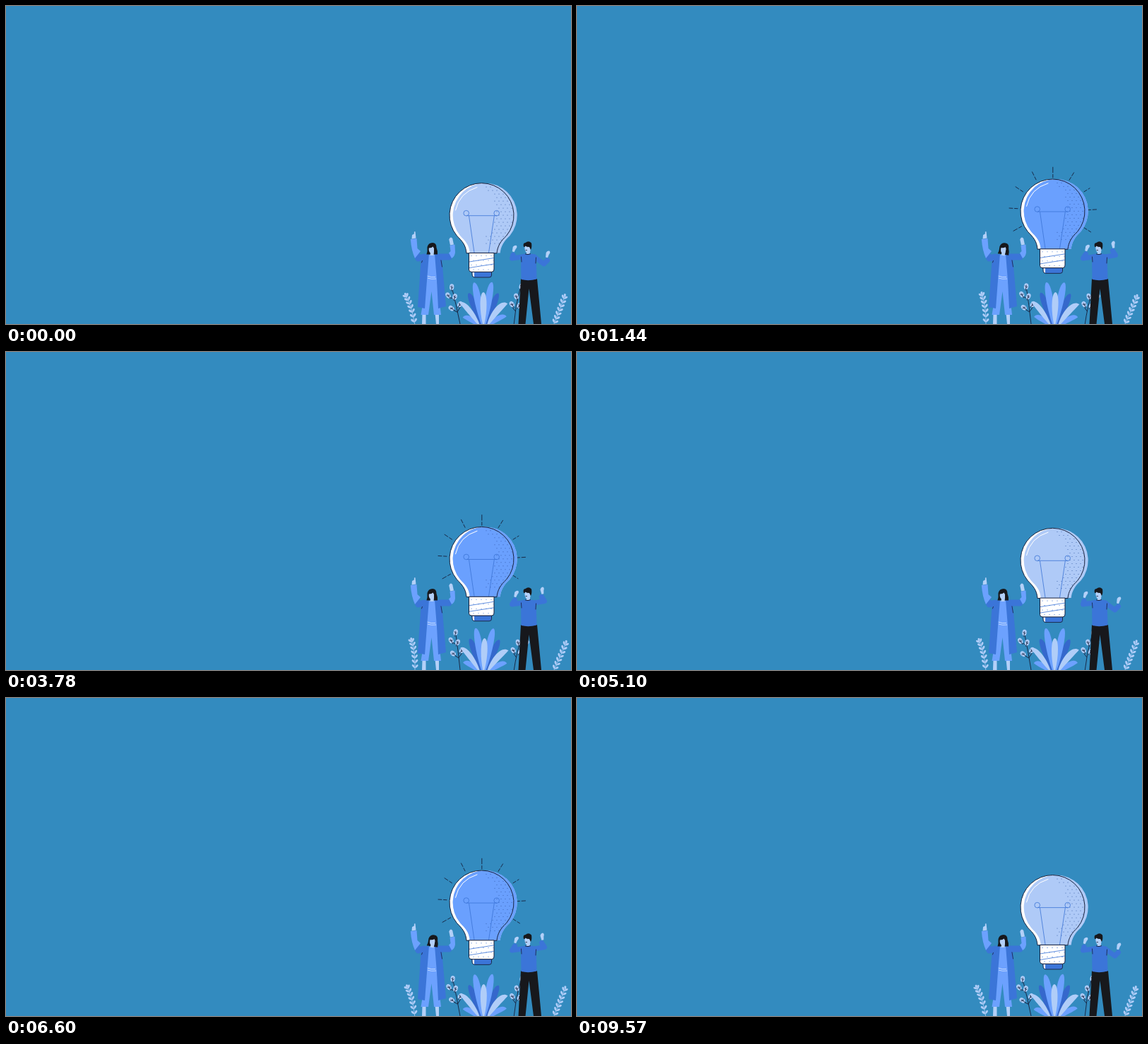
An HTML page for the animation above (9600 ms loop, 800 by 450 pixels).

```html
<!DOCTYPE html>
<html lang="en">
<head>
<meta charset="utf-8">
<style>
  html, body { margin: 0; height: 100%; overflow: hidden; background: #338bbf; }
  svg { display: block; width: 100%; height: 100%; }
  .ink { stroke: #17203c; fill: none; stroke-linecap: round; }
  .fine { stroke: #3c74d6; fill: none; stroke-width: .8; }
  .arm { fill: none; stroke-linejoin: round; stroke-linecap: round; }
  .skin { fill: #b3d0f8; }
  .sky { fill: #6ca1fe; }
  .coat { fill: #3b75d8; }
  .black { fill: #17181c; }
</style>
</head>
<body>
<svg viewBox="0 0 800 450">
  <defs>
    <path id="glass" d="M652 349.5C651 338 646 333 638.3 325A45.5 45.5 0 1 1 708.7 325C700 333 696 340 695 349.5Z"/>
    <path id="fist" d="M-1.5 6L-2.5 -.5Q-1 -4 1.8 -3.8Q4 -2 2.2 1L1.5 6Z"/>
  </defs>

  <g id="plants"></g>

  <g id="bulb">
    <g id="rays" class="ink" stroke-width=".9"></g>
    <use href="#glass" fill="#fff"/>
    <use href="#glass" x="4.7" fill="#afcaf7"/>
    <use id="glow" href="#glass" x="4.7" fill="#6aa0fe"/>
    <g id="dots" fill="#2c529f"></g>
    <path d="M636.5 289Q642 264 667 256.5" fill="none" stroke="#fff" stroke-width="1" stroke-linecap="round"/>
    <g class="fine">
      <circle cx="651.7" cy="293.2" r="3.8"/>
      <circle cx="694.7" cy="293.2" r="3.8"/>
      <path d="M652 296.7H695M655.5 297L663 349M691.3 297L683.5 349"/>
    </g>
    <use href="#glass" class="ink" stroke-width="1"/>
    <path d="M660 376H687.5V381Q687.5 384 684 384H664Q660 384 660 380Z" class="coat"/>
    <path d="M660.5 377H663V383.5Q660.5 383 660.5 380Z" fill="#fff"/>
    <path d="M660 376H687.5V381Q687.5 384 684 384H664Q660 384 660 380Z" class="ink" stroke-width=".9"/>
    <path d="M655.5 349.5H691V373Q691 376.3 687.5 376.3H659Q655.5 376.3 655.5 373Z" fill="#fff" stroke="#17203c"/>
    <path class="fine" d="M656 362L691 356.5M656 370.5L691 365"/>
    <g id="specks" fill="#3c74d6"></g>
  </g>

  <g id="woman">
    <path class="skin" d="M589.5 435H594.5V450H589ZM607.5 435H613V450H609Z"/>
    <path class="sky" d="M596 386H610L616 437H606L602.5 404L598 437H587.5Z"/>
    <path class="sky" d="M596 352H610L611 389H594Z"/>
    <path d="M596.5 382Q602 384.5 608 383.5M597 385Q602 387 609 386" fill="none" stroke="#d9e8ff" stroke-width=".8"/>
    <path class="coat" d="M599 351L590 352Q587 354 587.5 361L583 426L593 428L596 388ZM607 351L615 351Q618 355 617.5 362L623 425L612 428L610 388Z"/>
    <path class="ink" stroke-width=".8" d="M591.5 355L588.5 363M615.5 357L617.5 369"/>
    <g id="armL">
      <path class="arm" stroke="#3b75d8" stroke-width="9" d="M592 355L584 357L582 353"/>
      <path class="sky" d="M572.8 330L581.5 329L582.5 343L587 347L579 357Q574 346 572.8 330Z"/>
      <path class="skin" d="M574.5 329.5L575 324L577.8 322.5L578 319.2H579.5L580.5 328.5Z"/>
    </g>
    <g id="armR">
      <path class="arm" stroke="#3b75d8" stroke-width="9" d="M614 355L627 355"/>
      <path class="sky" d="M628.5 339L635.5 337.5L636 349Q635 355 631 357L627 349.5L629.5 347Z"/>
      <path class="skin" d="M629 338.5L627.3 330.5Q629 325.5 632.2 329L634 337.5Z"/>
    </g>
    <g id="headW">
      <path class="black" d="M595.5 351.5Q597 347 596.5 341Q598 335 604 335Q609.5 335 609.5 342Q611.5 347 611 351.5Z"/>
      <path class="skin" d="M598.8 342.5Q603 342.5 604.5 340.5L606 343V348L605.5 353H600.5L600.8 349.5Q598.3 347.5 598.8 342.5Z"/>
    </g>
  </g>

  <g id="man">
    <path class="black" d="M729 386H752L758 450H747L740.5 400L735.5 450H725.5Z"/>
    <path id="sleeves" class="arm" stroke="#3b75d8" stroke-width="7"/>
    <path class="coat" d="M729 352Q738 348.5 750.5 352L751.5 386.5Q740 389.5 729.5 387Z"/>
    <path class="ink" stroke-width=".8" d="M729.5 355L730 362M750.5 356L750 364"/>
    <g class="skin" id="fists"><use href="#fist"/><use href="#fist"/></g>
    <path class="skin" d="M734.5 339H742.5V346Q742 348 741.5 351H736.8V348.5Q734 347 734.5 339Z"/>
    <path class="black" d="M733 341Q731.5 335 735.5 335Q740 331.5 744 335.5Q745 341 743 345L741 341Q737 341 735.5 339.5Q735 341 733 341Z"/>
    <path class="ink" stroke-width="1" d="M735.5 351Q739 352.5 742.5 350.8"/>
    <path d="M735.5 345.5H738" stroke="#17203c" stroke-width=".8"/>
  </g>
</svg>
<script>
const $ = id => document.getElementById(id);
const clamp = v => Math.max(0, Math.min(1, v));
const ease = (a, b, t) => { const u = clamp((t - a) / (b - a)); return u * u * (3 - 2 * u); };
const mix = (a, b, u) => a + (b - a) * u;

function add(parent, tag, attrs) {
  const el = document.createElementNS('http://www.w3.org/2000/svg', tag);
  for (const k in attrs) el.setAttribute(k, attrs[k]);
  return parent.appendChild(el);
}

const PALE = '#b0cdf8', SKY = '#6ca1fe', DEEP = '#3568cc', INK = '#17203c';
const plants = [];

function plant(x, y, swing) {
  const el = add($('plants'), 'g', {});
  plants.push({ el, x, y, swing });
  return el;
}

function leaf(parent, x, y, tx, ty, width, fill, bend = 0) {
  const len = Math.hypot(tx - x, ty - y), angle = Math.atan2(ty - y, tx - x) * 180 / Math.PI;
  const near = len * .45, far = len * .98, top = bend - width, low = bend + width;
  add(parent, 'path', {
    d: `M0 0C${near} ${top} ${far} ${top} ${len} 0C${far} ${low} ${near} ${low} 0 0Z`,
    transform: `translate(${x} ${y}) rotate(${angle})`, fill
  });
}

// Stem bending from (x, y) to (tx, ty), with paired leaves
function sprig(x, y, bx, by, tx, ty, swing) {
  const g = plant(x, y, swing);
  add(g, 'path', { d: `M${x} ${y}Q${bx} ${by} ${tx} ${ty}`, fill: 'none', stroke: PALE, 'stroke-width': .8 });
  for (let i = 0; i < 7; i++) {
    const u = .08 + i * .135, v = 1 - u;
    const px = v * v * x + 2 * u * v * bx + u * u * tx, py = v * v * y + 2 * u * v * by + u * u * ty;
    const dir = Math.atan2(v * (by - y) + u * (ty - by), v * (bx - x) + u * (tx - bx));
    for (const side of [-.65, .65])
      leaf(g, px, py, px + 6.5 * Math.cos(dir + side), py + 6.5 * Math.sin(dir + side), 1.9, PALE);
  }
  leaf(g, tx, ty + 2.5, tx, ty - 3, 2, PALE);
}

function berries(x, y, stem, buds, swing) {
  const g = plant(x, y, swing);
  add(g, 'path', { d: stem, fill: 'none', stroke: INK, 'stroke-width': .9 });
  for (const [bx, by, tilt] of buds) {
    const b = add(g, 'g', { transform: `translate(${bx} ${by}) rotate(${tilt})` });
    add(b, 'ellipse', { rx: 3.2, ry: 4.4, fill: PALE });
    add(b, 'path', { d: 'M0 -2V6M0 1L-2 -1M0 2L2 0', fill: 'none', stroke: INK, 'stroke-width': .7 });
  }
}

sprig(579, 452, 578, 424, 570.5, 407.5, 7.5);
berries(643, 450, 'M643 450Q639 422 635 400M640 433L632 428M640 433L646 424M637 415L629 410',
  [[634.5, 397, 8], [628.5, 408.5, -30], [638, 411, 20], [632, 427, -50], [644.5, 422, 35]], 4.2);
berries(719, 452, 'M719 452Q722 425 730 400M722 432L717 425M725 415L722 412',
  [[732, 397, 20], [724, 411, -15], [736, 411, 40], [717.5, 422, -30], [728, 424, 35]], 2.5);

const bush = plant(676, 455, 1.4);
for (const [tx, ty, width, fill, bend] of [
  [656, 406, 6, DEEP, 1], [698, 407, 6, DEEP, -1], [664, 391, 6.5, SKY, 1], [689.5, 391, 6.5, SKY, -1],
  [647, 440, 5, SKY, 4], [709, 440, 5, SKY, -4], [643, 419, 5, PALE, 4], [711, 422, 6, PALE, -6], [677, 405, 6, PALE, 0]
]) leaf(bush, mix(676, tx, .12), 455, tx, ty, width, fill, bend);

sprig(775, 452, 784, 432, 792.5, 410.5, 1.8);

// Halftone shade along the right side of the glass
for (let row = 0; row < 17; row++)
  for (let col = 0; col < 8; col++) {
    const x = 680 + col * 6 + row % 2 * 3, y = 256 + row * 5;
    const inside = Math.hypot(x - 673.5, y - 296) < 44 || (y > 325 && x < 706 - (y - 325) * .55 && x > 687);
    if (inside && Math.hypot(x - 646, y - 292) > 48) add($('dots'), 'circle', { cx: x, cy: y, r: .5 });
  }
for (let i = 0; i < 20; i++)
  add($('specks'), 'circle', { cx: 659 + i % 5 * 7 + (i / 5 | 0) % 2 * 3, cy: 353.5 + (i / 5 | 0) * 6.5, r: .55 });

// Inner and outer end of each ray, clockwise from lower left
const rays = [
  [629.5, 317.5, 618, 324], [624, 292.4, 612, 291.7], [631.5, 268.5, 621, 261.5],
  [650, 251.5, 644.5, 240.5], [673.8, 248.5, 673.8, 233.8], [697, 252, 703.5, 241.5],
  [718, 268.5, 726, 263.5], [723, 294.3, 735.5, 293.6], [718, 319.5, 727.5, 325.5]
].map(ends => ({ ends, el: add($('rays'), 'line', { x1: ends[0], y1: ends[1], 'stroke-dasharray': '4.5 2.6 9' }) }));

const turn = (id, angle, x, y) => $(id).setAttribute('transform', `rotate(${angle} ${x} ${y})`);
const CYCLE = 4800;

function draw(time) {
  const t = time % CYCLE;
  const m = t < 2550 ? t : 5100 - t; // the lighting-up plays forward, then back

  const lift = t < 2400 ? 1 - (1 - t / 2400) ** 1.5 : 2 - t / 2400;
  $('bulb').setAttribute('transform', `translate(0 ${-7.6 * lift})`);
  $('glow').setAttribute('opacity', ease(600, 960, m));

  rays.forEach(({ ends: [x1, y1, x2, y2], el }, i) => {
    const u = clamp((m - 620 - 80 * i) / 80);
    el.setAttribute('x2', mix(x1, x2, u));
    el.setAttribute('y2', mix(y1, y2, u));
    el.setAttribute('visibility', u ? 'visible' : 'hidden');
  });

  const sway = -Math.cos((t + 200) / 2400 * 2 * Math.PI);
  for (const { el, x, y, swing } of plants)
    el.setAttribute('transform', `rotate(${sway * swing} ${x} ${y})`);

  const wave = Math.sin(Math.PI * clamp((m - 450) / 700));
  turn('armL', 3.5 * wave, 588, 356);
  turn('armR', 3 * wave, 617, 354);
  turn('headW', 9 * ease(400, 800, t) * (1 - ease(2700, 3300, t)), 603, 353);

  const up = ease(450, 1110, m);
  const lx = mix(720, 722.5, up) - 3 * wave, ly = mix(342, 341, up) - 3.5 * wave;
  const rx = mix(767, 759, up), ry = mix(350, 336.5, up) + 2.5 * wave;
  const elbowX = mix(761.5, 762.5, up), elbowY = mix(365, 352.5, up) + 2 * wave;
  $('sleeves').setAttribute('d',
    `M731 355L716.5 ${357 - wave}L${lx - 2} ${ly + 10}M748 355L${elbowX} ${elbowY}L${rx - .5} ${ry + 10}`);
  const [left, right] = $('fists').children;
  left.setAttribute('transform', `translate(${lx} ${ly}) rotate(18)`);
  right.setAttribute('transform', `translate(${rx} ${ry}) rotate(${mix(14, -8, up)})`);
}

function tick() {
  draw(performance.now());
  requestAnimationFrame(tick);
}
tick();
</script>
</body>
</html>
```
